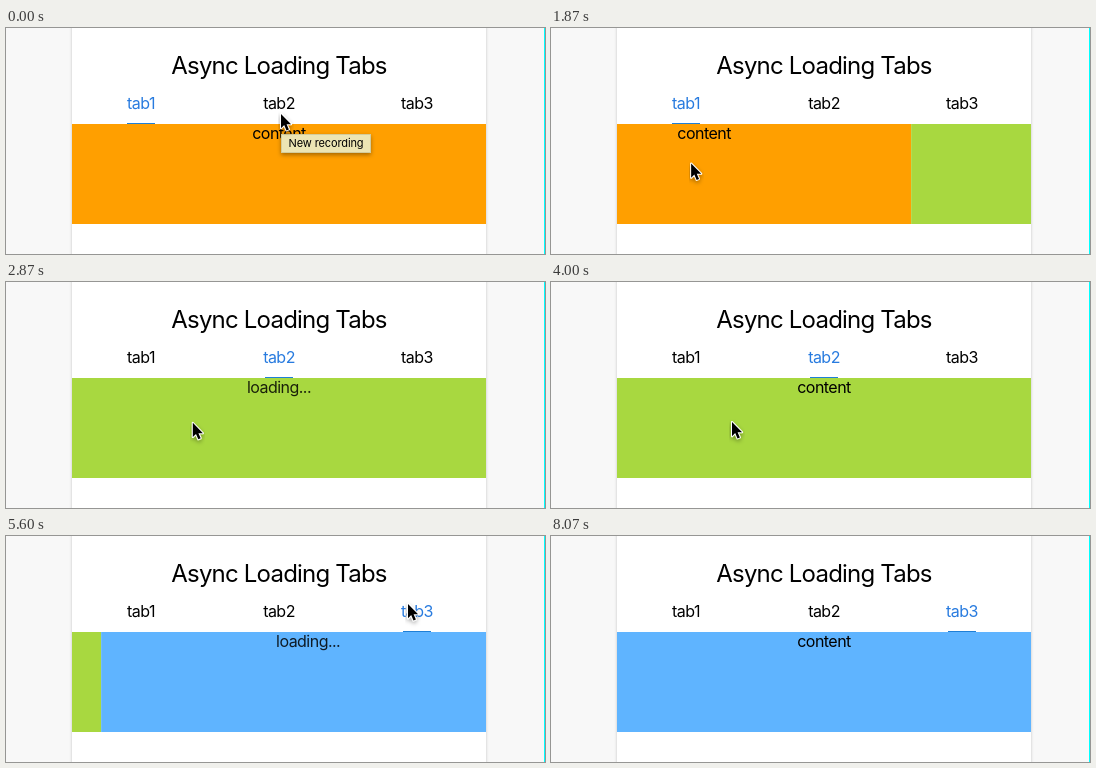
Recreate the animation shown at these times as an HTML page. Size 539 by 226 pixels, loop 8.39 s.

```html
<!DOCTYPE html>
<html lang="en">
<head>
<meta charset="utf-8">
<title>Async Loading Tabs</title>
<style>
  html, body { margin: 0; width: 100%; height: 100%; overflow: hidden; background: #f8f8f8; }
  svg { display: block; }
  text { font: 16px Inter, "Liberation Sans", sans-serif; letter-spacing: -.033em; text-anchor: middle; }
  .title { font-size: 24px; }
  #tip text { font-size: 11px; letter-spacing: -.01em; }
</style>
</head>
<body>
<svg width="539" height="226" viewBox="0 0 539 226">
  <defs>
    <clipPath id="view"><rect x="66" y="96" width="414" height="100"/></clipPath>
    <filter id="soft" x="-20%" y="-50%" width="140%" height="220%">
      <feDropShadow dx="0" dy="2" stdDeviation="2" flood-opacity=".35"/>
    </filter>
    <filter id="edge" x="-5%" y="-5%" width="110%" height="110%">
      <feDropShadow dx="0" dy="0" stdDeviation="1.5" flood-opacity=".22"/>
    </filter>
  </defs>
  <rect width="539" height="226" fill="#f8f8f8"/>
  <rect x="66" y="-20" width="414" height="266" fill="#fff" filter="url(#edge)"/>
  <rect x="538" width="1" height="226" fill="#0ff"/>
  <text class="title" x="273" y="46">Async Loading Tabs</text>
  <g id="tabs"></g>
  <g clip-path="url(#view)"><g id="strip"></g></g>
  <rect id="ink" y="95" width="28" height="1" fill="#1f7fd6"/>
  <g id="tip" filter="url(#soft)">
    <rect x="275.5" y="106.5" width="89" height="18" fill="#ece5b4" stroke="#d3cc9c"/>
    <text x="320" y="119">New recording</text>
  </g>
  <g id="cursor" filter="url(#soft)">
    <path d="M0 0V14.2L3.2 11.1 5.5 16.4 7.9 15.4 5.6 10.3H10.1Z"
      fill="#000" stroke="#fff" stroke-width="2" stroke-linejoin="round" paint-order="stroke"/>
  </g>
</svg>
<script>
const LOOP = 8390, WIDTH = 414, TAB = 138, SLIDE = 300;
const GRAB = 1330, RELEASE = 1962, TAP = 5392;
const COLORS = ['#ff9f00', '#a8d840', '#5fb4ff'];
const LOADED = [0, 4000, 7400];

// time, x, y of the pointer tip
const PATH = [
  [0, 275, 86], [200, 270, 80], [410, 270, 80], [870, 249, 118],
  [1270, 260, 144], [GRAB, 260, 144], [RELEASE, 133, 135], [2130, 132, 134],
  [2530, 188, 141], [2800, 188, 141], [3070, 181, 140], [4340, 181, 140],
  [5200, 402, 68], [5600, 402, 68], [6070, 248, 137], [7870, 248, 137],
  [8000, 515, 41]
];

const $ = id => document.getElementById(id);
const clamp = v => Math.min(1, Math.max(0, v));
const mix = (a, b, k) => a + (b - a) * k;
const smooth = k => k * k * (3 - 2 * k);

function add(parent, name, attrs, content = '') {
  const el = document.createElementNS('http://www.w3.org/2000/svg', name);
  for (const key in attrs) el.setAttribute(key, attrs[key]);
  el.textContent = content;
  return parent.appendChild(el);
}

function bezier(x1, y1, x2, y2) {
  const at = (a, b, s) => 3 * (1 - s) * (1 - s) * s * a + 3 * (1 - s) * s * s * b + s * s * s;
  return k => {
    let lo = 0, hi = 1;
    for (let i = 0; i < 24; i++) {
      const mid = (lo + hi) / 2;
      if (at(x1, x2, mid) < k) lo = mid; else hi = mid;
    }
    return at(y1, y2, hi);
  };
}
const slide = bezier(.35, 0, .25, 1);
const ease = bezier(.25, .1, .25, 1);

const tabs = COLORS.map((_, i) =>
  add($('tabs'), 'text', { x: 135 + i * TAB, y: 81 }, 'tab' + (i + 1)));
const labels = COLORS.map((fill, i) => {
  add($('strip'), 'rect', { x: 66 + i * WIDTH, y: 96, width: WIDTH, height: 100, fill });
  return add($('strip'), 'text', { x: 273 + i * WIDTH, y: 111 });
});

function pointer(t) {
  const i = PATH.findIndex(p => p[0] > t);
  if (i < 0) return PATH[PATH.length - 1].slice(1);
  const [t0, x0, y0] = PATH[i - 1], [t1, x1, y1] = PATH[i];
  const k = smooth((t - t0) / (t1 - t0));
  return [mix(x0, x1, k), mix(y0, y1, k)];
}

function scroll(t) {
  if (t < GRAB) return 0;
  if (t < RELEASE) return 260 - pointer(t)[0];
  if (t < TAP) return mix(127, WIDTH, slide(clamp((t - RELEASE) / SLIDE)));
  return mix(WIDTH, 2 * WIDTH, slide(clamp((t - TAP) / SLIDE)));
}

function draw(t) {
  const active = t < RELEASE ? 0 : t < TAP ? 1 : 2;
  tabs.forEach((el, i) => el.setAttribute('fill', i === active ? '#287bdf' : '#000'));
  labels.forEach((el, i) => {
    const ready = t >= LOADED[i];
    el.textContent = ready ? 'content' : 'loading...';
    el.setAttribute('fill-opacity', ready ? 1 : .85);
  });
  $('strip').setAttribute('transform', `translate(${-scroll(t)})`);

  const ink = ease(clamp((t - RELEASE) / SLIDE)) + ease(clamp((t - TAP) / 120));
  $('ink').setAttribute('x', 121 + TAB * ink);

  $('tip').setAttribute('opacity', 1 - clamp((t - 430) / 300));
  $('cursor').setAttribute('transform', `translate(${pointer(t)})`);
  $('cursor').setAttribute('visibility', t < 8070 ? 'visible' : 'hidden');
}

const start = performance.now();
function tick() {
  draw((performance.now() - start) % LOOP);
  requestAnimationFrame(tick);
}
tick();
</script>
</body>
</html>
```
